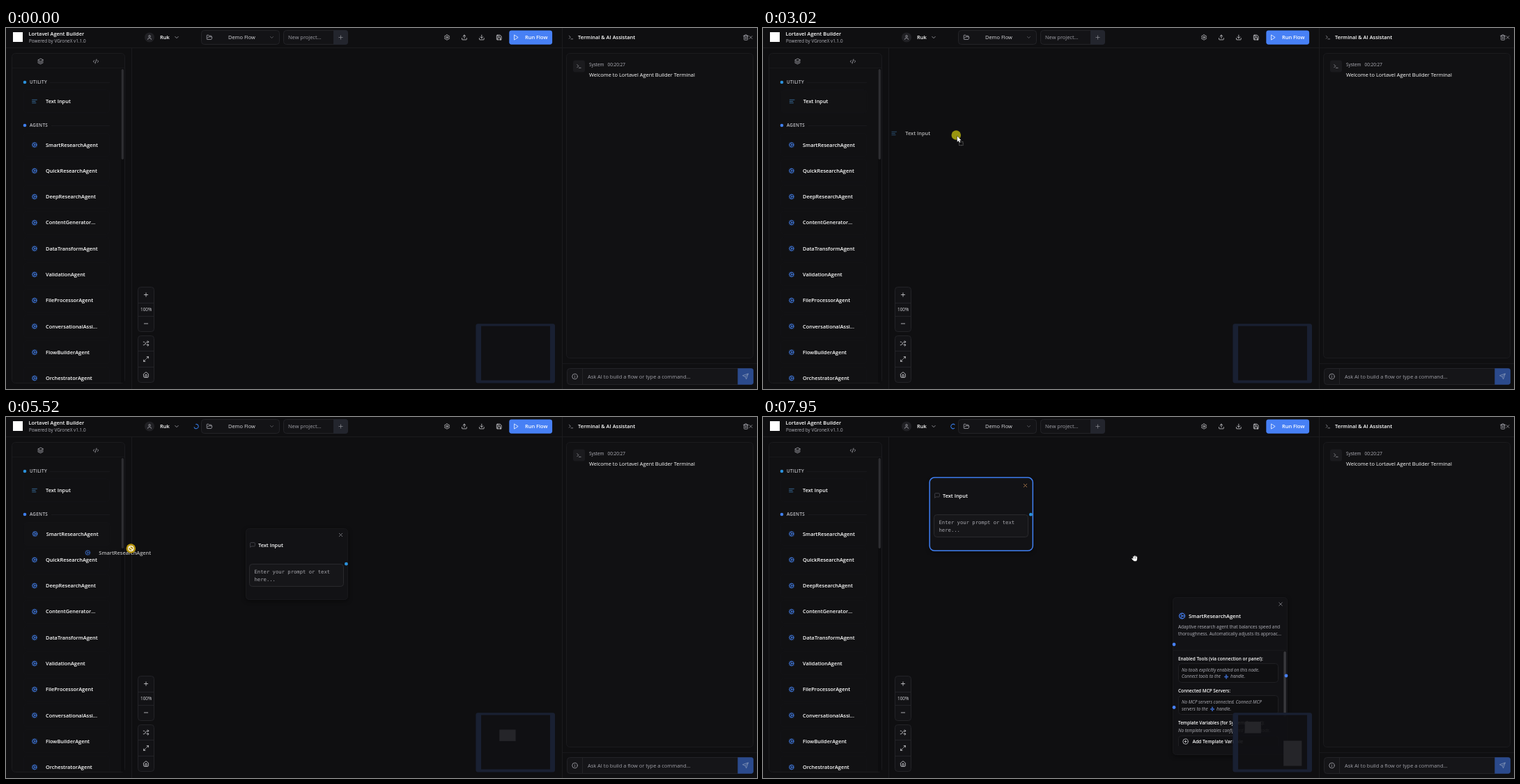
An HTML page with a canvas that plays this animation: 1078 px wide and 519 px high, repeating every 8000 ms.

```html
<!DOCTYPE html>
<html lang="en">
<head>
<meta charset="utf-8">
<title>Agent flow editor</title>
<style>
html, body { margin: 0; width: 100%; height: 100%; overflow: hidden; background: #0f0f11; }
canvas { display: block; width: 100vw; height: 100vh; }
</style>
</head>
<body>
<canvas id="stage" width="1078" height="519"></canvas>
<script>
const ctx = document.getElementById('stage').getContext('2d');
const LOOP = 8000;
const SANS = '"Open Sans", "Noto Sans", sans-serif';
const MONO = '"DejaVu Sans Mono", monospace';
const BG = '#0f0f11', PANEL = '#111113', LINE = '#1b1b1e', EDGE = '#232327';
const WHITE = '#ffffff', SOFT = '#dcdce0', GRAY = '#b4b4bc', DIM = '#8a8a91';
const BLUE = '#4780f5', SKY = '#2b90da', YELLOW = '#98950f';

const ring = (x, y, r) => `M${x + r} ${y}a${r} ${r} 0 1 1 ${-2 * r} 0a${r} ${r} 0 1 1 ${2 * r} 0`;
const gear = 'M' + Array.from({ length: 48 }, (_, i) => {
  const a = i * Math.PI / 24, r = 8.7 + 1.4 * Math.cos(6 * a);
  return (12 + r * Math.sin(a)).toFixed(1) + ' ' + (12 - r * Math.cos(a)).toFixed(1);
}).join('L') + 'Z' + ring(12, 12, 3);

// Icons on a 24 unit grid
const ICONS = {
  gear,
  layers: 'M12 2 2 7l10 5 10-5zM2 12l10 5 10-5M2 17l10 5 10-5',
  code: 'M18 16l4-4-4-4M6 8l-4 4 4 4M14.5 4l-5 16',
  lines: 'M21 6H3M15 12H3M17 18H3',
  cog: ring(12, 12, 8) + ring(12, 12, 2) + 'M12 2v2M12 20v2M2 12h2M14 12h8M11 10.3 7 3.3M11 13.7l-4 7M17 20.7l-1-1.7M17 3.3l-1 1.7M20.7 17l-1.7-1M20.7 7l-1.7 1M3.3 17l1.7-1M3.3 7l1.7 1',
  user: 'M19 21v-2a4 4 0 0 0-4-4H9a4 4 0 0 0-4 4v2' + ring(12, 7, 4),
  down: 'M6 9l6 6 6-6',
  folder: 'M6 14l1.5-3A2 2 0 0 1 9.2 10H20a2 2 0 0 1 2 2.5l-1.6 6a2 2 0 0 1-2 1.5H4a2 2 0 0 1-2-2V5a2 2 0 0 1 2-2h4l2.5 3H18a2 2 0 0 1 2 2v2',
  plus: 'M5 12h14M12 5v14',
  minus: 'M5 12h14',
  upload: 'M21 15v4a2 2 0 0 1-2 2H5a2 2 0 0 1-2-2v-4M17 8l-5-5-5 5M12 3v12',
  download: 'M21 15v4a2 2 0 0 1-2 2H5a2 2 0 0 1-2-2v-4M7 10l5 5 5-5M12 15V3',
  save: 'M19 21H5a2 2 0 0 1-2-2V5a2 2 0 0 1 2-2h11l5 5v11a2 2 0 0 1-2 2zM17 21v-8H7v8M7 3v5h8',
  play: 'M5 3l14 9-14 9z',
  prompt: 'M4 17l6-6-6-6M12 19h8',
  trash: 'M3 6h18M19 6v14a2 2 0 0 1-2 2H7a2 2 0 0 1-2-2V6M8 6V4a2 2 0 0 1 2-2h4a2 2 0 0 1 2 2v2M10 11v6M14 11v6',
  close: 'M18 6 6 18M6 6l12 12',
  info: ring(12, 12, 10) + 'M12 16v-4M12 8h.01',
  add: ring(12, 12, 10) + 'M8 12h8M12 8v8',
  send: 'M22 2l-7 20-4-9-9-4zM22 2 11 13',
  shuffle: 'M2 18h2q2 0 3-2l6-8q1-2 3-2h6M18 2l4 4-4 4M2 6h2q2 0 3.5 2M22 18h-6q-2 0-3.5-2.5M18 14l4 4-4 4',
  expand: 'M15 3h6v6M9 21H3v-6M21 3l-7 7M3 21l7-7',
  home: 'M3 9l9-7 9 7v11a2 2 0 0 1-2 2H5a2 2 0 0 1-2-2zM9 22V12h6v10',
  note: 'M21 15a2 2 0 0 1-2 2H7l-4 4V5a2 2 0 0 1 2-2h14a2 2 0 0 1 2 2z',
  spark: 'M12 3l2.5 6.5L21 12l-6.5 2.5L12 21l-2.5-6.5L3 12l6.5-2.5zM12 9v6M9 12h6',
  check: 'M20 6 9 17l-5-5'
};
for (const name in ICONS) ICONS[name] = new Path2D(ICONS[name]);

function icon(name, cx, cy, size, color) {
  ctx.save();
  ctx.translate(cx - size / 2, cy - size / 2);
  ctx.scale(size / 24, size / 24);
  ctx.strokeStyle = color;
  ctx.lineWidth = 2;
  ctx.lineCap = ctx.lineJoin = 'round';
  ctx.stroke(ICONS[name]);
  ctx.restore();
}

function box(x, y, w, h, r, fill, stroke, lw = 1) {
  ctx.beginPath();
  ctx.roundRect(x + lw / 2, y + lw / 2, w - lw, h - lw, r);
  if (fill) { ctx.fillStyle = fill; ctx.fill(); }
  ctx.lineWidth = lw;
  ctx.strokeStyle = stroke;
  ctx.stroke();
}

function solid(x, y, w, h, r, color) {
  ctx.beginPath();
  ctx.roundRect(x, y, w, h, r);
  ctx.fillStyle = color;
  ctx.fill();
}

function rect(x, y, w, h, color) {
  ctx.fillStyle = color;
  ctx.fillRect(x, y, w, h);
}

function dot(x, y, r, color) {
  ctx.beginPath();
  ctx.arc(x, y, r, 0, 7);
  ctx.fillStyle = color;
  ctx.fill();
}

// y is the middle of the capitals
function text(s, x, y, color, size = 7.45, style = '400', family = SANS) {
  ctx.font = `${style} ${size}px ${family}`;
  ctx.fillStyle = color;
  ctx.fillText(s, x, y + size * 0.36);
}
const bold = (s, x, y, color = WHITE, size = 7.4) => text(s, x, y, color, size, '600');
const small = (s, x, y, color = GRAY) => text(s, x, y, color, 6.4);
const slanted = (s, x, y) => text(s, x, y, GRAY, 6.4, 'italic 400');

const AGENTS = ['SmartResearchAgent', 'QuickResearchAgent', 'DeepResearchAgent', 'ContentGenerator...',
  'DataTransformAgent', 'ValidationAgent', 'FileProcessorAgent', 'ConversationalAssi...',
  'FlowBuilderAgent', 'OrchestratorAgent'];

function label(name, x, y) {
  if (name === 'Text Input') icon('lines', x + 41, y, 9, '#3f7fb8');
  else icon('cog', x + 41, y, 9, '#437fea');
  bold(name, x + 57, y);
}

function item(name, y, active) {
  const x = active ? 0.7 : 0;
  box(25 + x, y - 17, 124, 34, 4, active ? '#121214' : PANEL, '#131316');
  label(name, x, y);
}

function section(name, y, color, lineX) {
  dot(27, y, 2.3, color);
  ctx.letterSpacing = '0.3px';
  bold(name, 34, y, '#c4c4ca', 6.35);
  ctx.letterSpacing = '0px';
  rect(lineX, y, 149 - lineX, 1, '#19191c');
}

function header() {
  rect(0, 28, 1078, 1, LINE);
  rect(10, 6, 14, 14, '#ffffff');
  bold('Lortavel Agent Builder', 32.5, 8.5);
  small('Powered by VGroneX v1.1.0', 33, 18.5);
  dot(206, 13.5, 7, '#202024');
  icon('user', 206, 13.5, 8, GRAY);
  bold('Ruk', 221, 13.5);
  icon('down', 245, 13.5, 9, GRAY);
  box(280, 3, 113, 21, 4, '#131316', EDGE);
  icon('folder', 292, 13.5, 9, GRAY);
  text('Demo Flow', 319, 13.5, SOFT);
  icon('down', 381.5, 13.5, 8, '#77777d');
  box(398, 3, 93, 21, 4, '#131316', EDGE);
  text('New project...', 405, 13.5, '#a2a2a9');
  solid(470, 3, 21, 21, [0, 4, 4, 0], '#23252d');
  icon('plus', 480.5, 13.5, 9, DIM);
  ['gear', 'upload', 'download', 'save'].forEach((n, i) => icon(n, 633 + i * 24.9, 13.5, 9, SOFT));
  solid(722.3, 3.4, 61.8, 20.3, 3.4, BLUE);
  icon('play', 732.5, 13.5, 9, '#fff');
  bold('Run Flow', 745, 13.5);
}

function sidebar(t) {
  rect(180, 29, 1, 490, LINE);
  box(8, 36, 163, 475, 5, PANEL, LINE);
  rect(9, 57, 161, 1, '#18181b');
  icon('layers', 49.5, 48, 9, GRAY);
  icon('code', 129, 48, 9, GRAY);
  ctx.save();
  ctx.beginPath();
  ctx.rect(9, 58, 161, 452);
  ctx.clip();
  section('UTILITY', 78, SKY, 63);
  item('Text Input', 105.5, t >= 2680 && t < 3600);
  section('AGENTS', 140, '#3f7ff0', 65);
  AGENTS.forEach((name, i) => item(name, 168 + i * 37.27, i === 0 && t >= 5240 && t < 6880));
  rect(165, 58, 5, 452, '#0d0d0f');
  solid(165.6, 59, 3.4, 130, 1.7, '#2d2d31');
  ctx.restore();
}

function terminal() {
  rect(798, 0, 1, 519, LINE);
  icon('prompt', 811, 13.5, 8, GRAY);
  bold('Terminal & AI Assistant', 821, 13.5);
  icon('trash', 1062, 13.5, 9, GRAY);
  icon('close', 1069, 13.5, 8, GRAY);
  box(804, 36, 269, 439, 5, PANEL, LINE);
  solid(814, 46.5, 17, 17, 3, '#1b1b1e');
  icon('prompt', 822.5, 55, 8, GRAY);
  small('System', 837, 53);
  small('00:20:27', 863.5, 53);
  text('Welcome to Lortavel Agent Builder Terminal', 837, 67.5, WHITE);
  rect(799, 482, 279, 1, '#18181b');
  box(805, 489, 268, 24, 4, '#151518', EDGE);
  rect(827, 490, 1, 22, EDGE);
  icon('info', 816.5, 501, 9, GRAY);
  text('Ask AI to build a flow or type a command...', 835, 501.5, '#a2a2a9');
  solid(1050.3, 489.3, 22.6, 23.4, [0, 3.4, 3.4, 0], '#2b4a8c');
  icon('send', 1061.5, 501, 9, '#8d9cbd');
}

function controls() {
  box(189, 372, 24, 65, 4, '#131316', EDGE);
  rect(190, 395, 22, 1, EDGE);
  rect(190, 414, 22, 1, EDGE);
  icon('plus', 201, 383.5, 9, SOFT);
  small('100%', 193, 405, SOFT);
  icon('minus', 201, 425, 9, SOFT);
  box(189, 442, 24, 68, 4, '#131316', EDGE);
  rect(190, 464, 22, 1, EDGE);
  rect(190, 487, 22, 1, EDGE);
  ['shuffle', 'expand', 'home'].forEach((n, i) => icon(n, 201, 453.5 + i * 22.5, 9, SOFT));
}

// Cursor waypoints: time, x, y
const PATH = [
  [540, 634, 456], [1290, 142, 119], [1630, 124, 107], [2600, 124, 107], [2700, 130, 108],
  [3020, 277, 154], [3350, 345, 127], [3600, 345, 127], [3940, 218, 166], [4340, 103, 162],
  [5200, 103, 162], [5520, 179, 189], [6380, 588, 227], [6680, 588, 227], [7080, 420, 172],
  [7150, 420, 172], [7690, 316, 101], [7950, 533, 203], [8000, 560, 212]
];

const slope = (i, k) => (PATH[i + 1][k] - PATH[i][k]) / (PATH[i + 1][0] - PATH[i][0]);

function tangent(i, k) {
  if (i === 0 || i === PATH.length - 1) return 0;
  const a = slope(i - 1, k), b = slope(i, k);
  return a * b <= 0 ? 0 : 2 * a * b / (a + b);
}

// Monotone cubic through the waypoints
function cursorAt(t) {
  let i = 0;
  while (i < PATH.length - 2 && t >= PATH[i + 1][0]) i++;
  const p = PATH[i], q = PATH[i + 1], d = q[0] - p[0];
  const u = Math.max(0, Math.min(1, (t - p[0]) / d)), v = 1 - u;
  return [1, 2].map(k => p[k] * v * v * (1 + 2 * u) + q[k] * u * u * (3 - 2 * u) +
    d * u * v * (tangent(i, k) * v - tangent(i + 1, k) * u));
}

function card(x, y, w, h) {
  ctx.save();
  ctx.shadowColor = 'rgba(0,0,0,.45)';
  ctx.shadowBlur = 6;
  ctx.shadowOffsetY = 2;
  solid(x, y, w, h, 5, '#121215');
  ctx.restore();
  box(x, y, w, h, 5, null, '#18181b');
}

function textNode(dx, dy, selected) {
  ctx.save();
  ctx.translate(dx, dy);
  card(344, 160, 147, 103);
  if (selected) box(342.4, 157.3, 149.7, 106.8, 7, null, '#3f7ff2', 1.5);
  icon('close', 480.5, 169.5, 9, selected ? '#c58a55' : DIM);
  icon('note', 354, 184, 9, '#4e4e54');
  bold('Text Input', 362, 184.5);
  box(349, 211, 136, 33, 4, '#161619', '#29292d');
  text('Enter your prompt or text', 356.5, 222, '#a5a5ab', 7.23, '400', MONO);
  text('here...', 356.5, 233, '#a5a5ab', 7.23, '400', MONO);
  dot(488.4, 211.2, 2.4, SKY);
  ctx.restore();
}

function agentNode() {
  card(588, 259, 165, 227);
  icon('close', 743, 269, 9, DIM);
  icon('cog', 601.5, 286, 11, BLUE);
  bold('SmartResearchAgent', 611, 286);
  small('Adaptive research agent that balances speed and', 596, 302);
  small('thoroughness. Automatically adjusts its approac...', 596, 311.5);
  rect(589, 335, 163, 1, '#18181b');
  solid(747.4, 337, 3.4, 94, 1.7, '#38383c');
  bold('Enabled Tools (via connection or panel):', 596, 347.5, WHITE, 6.4);
  box(596, 354, 144, 28, 4, BG, '#1f1f23');
  slanted('No tools explicitly enabled on this node.', 601, 363.5);
  slanted('Connect tools to the', 601, 373);
  icon('spark', 665, 373.5, 8, BLUE);
  slanted('handle.', 671, 373);
  bold('Connected MCP Servers:', 596, 393.5, WHITE, 6.4);
  box(596, 400, 144, 28, 4, BG, '#1f1f23');
  slanted('No MCP servers connected. Connect MCP', 601, 410);
  slanted('servers to the', 601, 419.5);
  icon('spark', 645, 420, 8, BLUE);
  slanted('handle.', 651, 419.5);
  bold('Template Variables (for System Prompt):', 596, 440, WHITE, 6.4);
  slanted('No template variables configured for this node.', 596, 451);
  ctx.save();
  ctx.beginPath();
  ctx.rect(590, 456, 160, 17);
  ctx.clip();
  box(596, 458, 144, 20, 4, '#0f0f12', '#1f1f23');
  ctx.restore();
  icon('add', 606.5, 466.5, 9, SOFT);
  bold('Add Template Variable', 616.5, 467, WHITE, 6.7);
  dot(590, 327, 2.4, BLUE);
  dot(751, 372, 2.4, BLUE);
  dot(590, 417.5, 2.4, BLUE);
}

function minimap(nodes) {
  const S = 0.16;
  solid(674.4, 425.2, 113.6, 85.2, 3, 'rgba(17,17,20,.92)');
  for (const [x, y, w, h] of nodes) {
    rect(682 + (x - 181) * S, 428.5 + (y - 29) * S, w * S, h * S, '#252529');
  }
  ctx.beginPath();
  ctx.roundRect(674.4, 425.2, 113.6, 85.2, 3);
  ctx.rect(682, 428.5, 99, 78);
  ctx.fillStyle = '#192032';
  ctx.fill('evenodd');
}

function tooltip(t, start, end, y, title, lines) {
  if (t < start || t >= end) return;
  const p = Math.min(1, (t - start) / 160), x = 157 - 6.5 * (1 - p);
  const h = 18 + lines.length * 9.4;
  ctx.save();
  ctx.globalAlpha = p;
  box(x, y - h / 2, 174, h, 4, '#18181b', '#27272a');
  bold(title, x + 7, y - h / 2 + 10, WHITE, 6.4);
  lines.forEach((s, i) => small(s, x + 7, y - h / 2 + 19.6 + i * 9.2));
  ctx.restore();
}

function saveState(t) {
  if (t < 3650) return;
  if (t >= 6030 && t < 6950) return icon('check', 273.5, 13.5, 7, SKY);
  const a = (t - 3940) / 1000 * 2 * Math.PI;
  ctx.beginPath();
  ctx.arc(273, 13.5, 3.2, a + 0.8, a - 0.8 + 2 * Math.PI);
  ctx.strokeStyle = '#3579e0';
  ctx.lineWidth = 1.1;
  ctx.stroke();
}

function hand(x, y) {
  ctx.save();
  ctx.translate(x, y);
  ctx.lineCap = ctx.lineJoin = 'round';
  const shape = new Path2D('M-1.9 1V-2.4M-.3 0V-3.3M1.3 0V-3M2.8 1V-2M-2.2 2.2-3.8.4M-1.8 1.2H2.7L2 3.4H-.8z');
  ctx.strokeStyle = '#050506';
  ctx.lineWidth = 2.6;
  ctx.stroke(shape);
  ctx.strokeStyle = ctx.fillStyle = '#fff';
  ctx.lineWidth = 1.3;
  ctx.stroke(shape);
  ctx.fill(shape);
  ctx.restore();
}

function arrow(x, y) {
  ctx.save();
  ctx.translate(x, y);
  ctx.strokeStyle = '#8a8a8a';
  ctx.lineWidth = 0.8;
  ctx.setLineDash([1, 0.6]);
  ctx.strokeRect(2.8, 8.2, 5.6, 5);
  ctx.setLineDash([]);
  const shape = new Path2D('M0 0V8.2L1.9 6.5 3.2 9.2 4.5 8.6 3.3 6H5.8z');
  ctx.strokeStyle = '#111';
  ctx.stroke(shape);
  ctx.fillStyle = '#fff';
  ctx.fill(shape);
  ctx.restore();
}

function noDrop(x, y) {
  ctx.beginPath();
  ctx.arc(x, y, 3.5, 0, 7);
  ctx.moveTo(x - 2.4, y - 2.4);
  ctx.lineTo(x + 2.4, y + 2.4);
  ctx.strokeStyle = '#fff';
  ctx.lineWidth = 1.2;
  ctx.stroke();
}

function pointer(t, x, y) {
  if (t < 540) return;
  const first = t >= 2680 && t < 3350, second = t >= 5240 && t < 6480;
  if (first || second) {
    ctx.globalAlpha = 0.7;
    if (first) label('Text Input', x - 130, y - 2.5);
    else label(AGENTS[0], x - 103, y + 6);
    ctx.globalAlpha = 1;
    const blocked = x < 180;
    dot(x, y, 6.8, blocked ? '#b8960f' : YELLOW);
    if (blocked) noDrop(x, y);
    else arrow(x + 1.5, y + 1.5);
    return;
  }
  if (t >= 7110 && t < 7690) dot(x, y, 6.8, YELLOW);
  hand(x, y);
}

function draw(t) {
  rect(0, 0, 1078, 519, BG);
  const [cx, cy] = cursorAt(t);
  const nodes = [];
  if (t >= 3600) {
    const held = t < 7150 ? [420, 172] : cursorAt(Math.min(t, 7690));
    textNode(held[0] - 420, held[1] - 172, t >= 7110);
    nodes.push(t < 7690 ? [345, 160, 146, 103] : [241, 89, 146, 103]);
  }
  if (t >= 6620) {
    agentNode();
    nodes.push([588, 260, 164, 226]);
  }
  controls();
  minimap(nodes);
  sidebar(t);
  header();
  terminal();
  saveState(t);
  tooltip(t, 2020, 2680, 105.5, 'Text Input',
    ['A node to provide text input to a flow or agent. Has a', 'large text box.']);
  tooltip(t, 4640, 5240, 168, AGENTS[0],
    ['Adaptive research agent that balances speed and', 'thoroughness. Automatically adjusts its approach', 'based on the question.']);
  pointer(t, cx, cy);
}

function tick() {
  draw(performance.now() % LOOP);
  requestAnimationFrame(tick);
}
tick();
</script>
</body>
</html>
```
